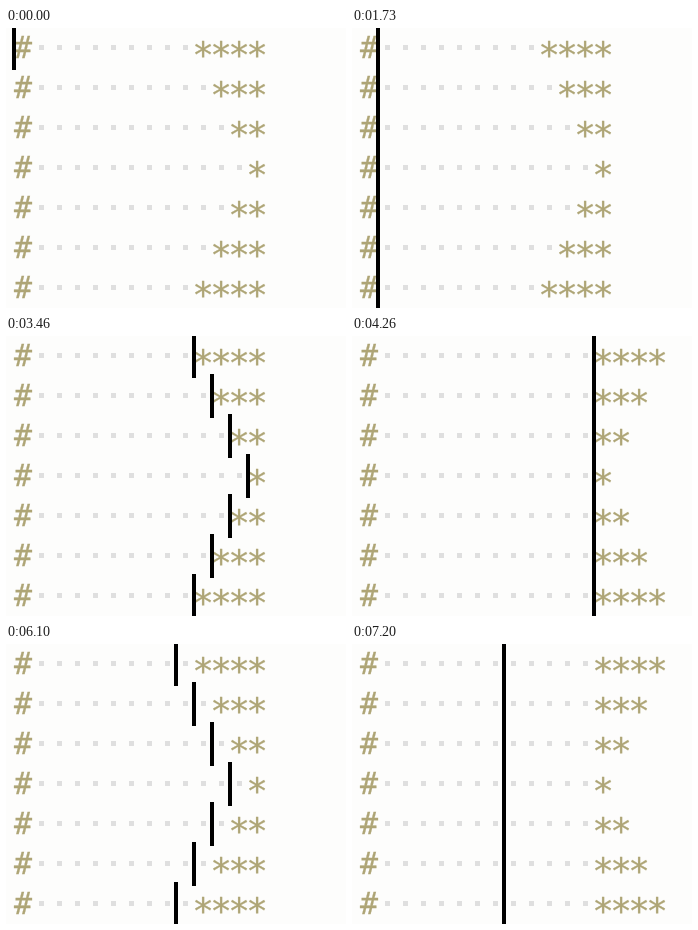
Recreate the animation shown at these times as an HTML page. Size 340 px wide and 280 px high, loop 8 s.

```html
<!DOCTYPE html>
<html lang="en">
<head>
<meta charset="utf-8">
<title>Aligning with multiple cursors</title>
<style>
  html, body { margin: 0; width: 100%; height: 100%; overflow: hidden; background: #fdfdfc; }
  svg { display: block; width: 340px; height: 280px; }
  text { font-family: "DejaVu Sans Mono", monospace; fill: #aea576; stroke: #aea576; stroke-width: .3px; }
  .hash { font-size: 30px; }
  .star { font-size: 36px; text-anchor: middle; }
  .dot { fill: #dfdfdf; }

  .cursors, .cursor, .stars, .pad {
    --cell: 18px;
    animation: 8s step-end infinite;
  }
  .cursors { animation-name: column; }
  .cursor { animation-name: slant, var(--show); }
  .stars { animation-name: align; }
  .pad { animation-name: pad; }

  /* shared column of all cursors */
  @keyframes column {
    0% { transform: translateX(0); }
    21.625% { transform: translateX(18px); }
    28.25% { transform: translateX(252px); }
    43.25% { transform: translateX(180px); }
    53.25% { transform: translateX(234px); }
    63.75% { transform: translateX(180px); }
    76.25% { transform: translateX(162px); }
    78.75% { transform: translateX(126px); }
    79.125% { transform: translateX(90px); }
    90%, 100% { transform: translateX(144px); }
  }
  /* per-row indent while the cursors follow the text */
  @keyframes slant {
    0%, 53.25% { transform: translateX(0); }
    43.25%, 63.75% { transform: translateX(calc(var(--indent) * var(--cell))); }
    90%, 100% { transform: translateX(0); }
  }
  @keyframes align {
    0%, 63.75% { transform: translateX(0); }
    53.25%, 90%, 100% { transform: translateX(calc((3 - var(--indent)) * var(--cell))); }
  }
  @keyframes pad {
    0%, 63.75% { opacity: 0; }
    53.25%, 90%, 100% { opacity: 1; }
  }
  @keyframes show1 { 0% { opacity: 0; } 2%, 100% { opacity: 1; } }
  @keyframes show2 { 0% { opacity: 0; } 2.875%, 100% { opacity: 1; } }
  @keyframes show3 { 0% { opacity: 0; } 3.75%, 100% { opacity: 1; } }
</style>
</head>
<body>
<svg id="stage" viewBox="0 0 340 280"></svg>
<script>
  const CELL = 18, LINE = 40, LEFT = 8, ROWS = 7, EDGE = 13;
  const stage = document.getElementById("stage");

  function add(parent, tag, attrs, text = "") {
    const el = document.createElementNS("http://www.w3.org/2000/svg", tag);
    for (const key in attrs) el.setAttribute(key, attrs[key]);
    el.textContent = text;
    return parent.appendChild(el);
  }

  const lines = add(stage, "g", {});
  const cursors = add(stage, "g", { class: "cursors" });

  for (let row = 0; row < ROWS; row++) {
    const top = row * LINE;
    const indent = 3 - Math.abs(row - 3);
    const start = 10 + indent;
    const style = `--indent:${indent};--show:${row ? "show" + Math.ceil(row / 2) : "none"}`;

    add(lines, "text", { class: "hash", x: LEFT, y: top + 30 }, "#");

    const pad = add(lines, "g", { class: "pad" });
    for (let col = 1; col < EDGE; col++) {
      add(col < start ? lines : pad, "rect",
        { class: "dot", x: LEFT + col * CELL + 7, y: top + 17, width: 5, height: 5 });
    }

    const stars = add(lines, "g", { class: "stars", style });
    for (let col = start; col <= EDGE; col++) {
      add(stars, "text", { class: "star", x: LEFT + (col + .5) * CELL, y: top + 39 }, "*");
    }

    add(cursors, "rect", { class: "cursor", style, x: LEFT - 2, y: top - 2, width: 4, height: 44 });
  }
</script>
</body>
</html>
```
